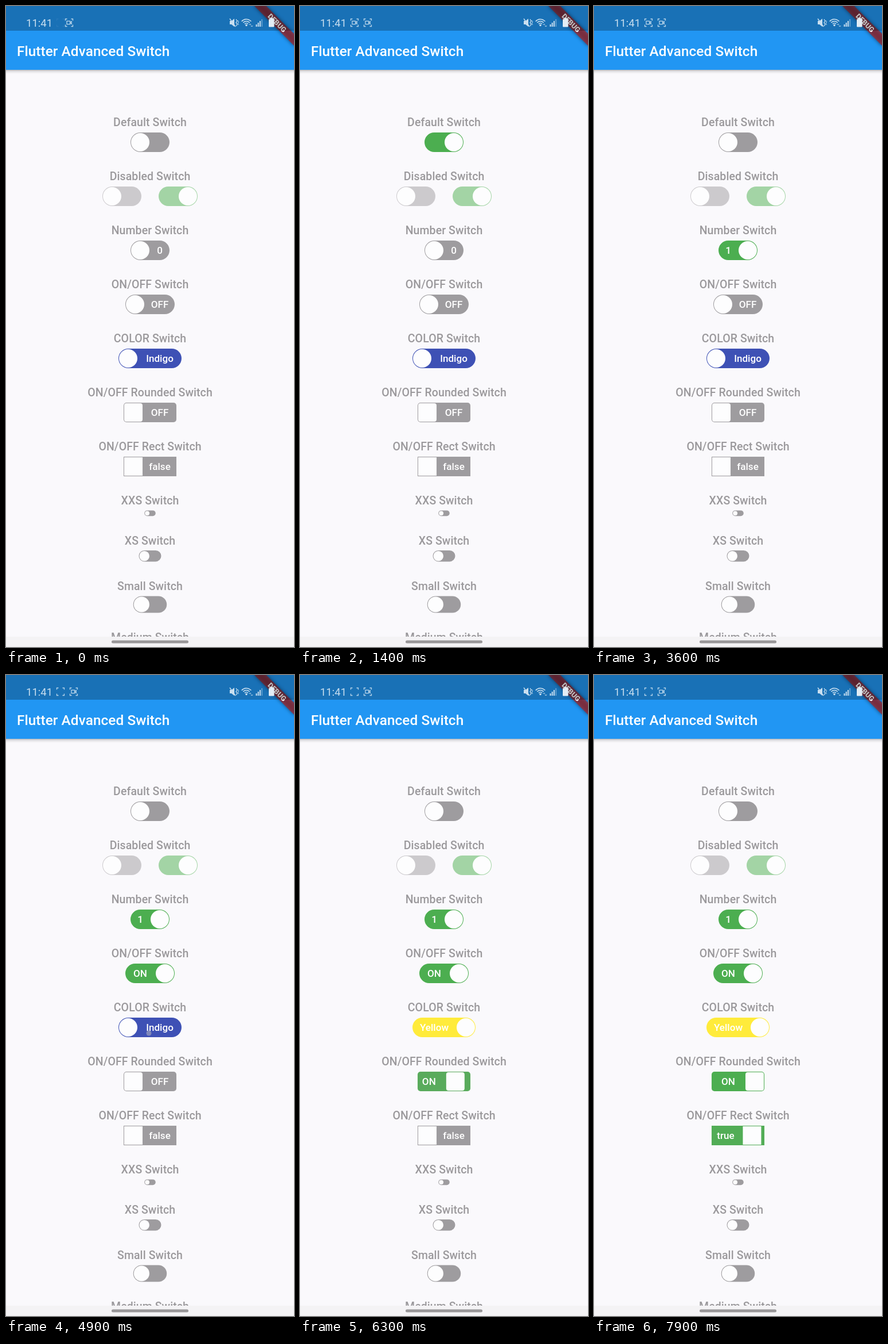
Write an HTML page with a canvas that moves like this. It is 502x1115 px and loops after 8000 ms.

```html
<!DOCTYPE html>
<html lang="en">
<head>
<meta charset="utf-8">
<title>Advanced Switch</title>
<style>
  html, body { margin: 0; width: 100%; height: 100%; overflow: hidden; background: #faf9fc; }
  canvas { display: block; width: 502px; height: 1115px; }
</style>
</head>
<body>
<canvas id="stage"></canvas>
<script>
const W = 502, H = 1115, CX = 251, LOOP = 8000, SLIDE = 250;
const GREY = [158, 156, 159], GREEN = [76, 174, 80], INDIGO = [62, 81, 181], YELLOW = [255, 235, 59];
const PALE_GREY = [204, 202, 205], PALE_GREEN = [163, 212, 165];
const BACK = '#faf9fc', KNOB = '#fdfdfe', LABEL = '#9b999c', STATUS = '#c9dff0';

const canvas = document.getElementById('stage');
const ratio = window.devicePixelRatio || 1;
canvas.width = W * ratio;
canvas.height = H * ratio;
const ctx = canvas.getContext('2d');

// taps: times at which the switch starts to toggle
const switches = [
  { y: 237, w: 68, taps: [900, 2100] },
  { x: 202, y: 331, w: 68, off: PALE_GREY },
  { x: 300, y: 331, w: 68, off: PALE_GREEN, fixed: 1 },
  { y: 425, w: 68, taps: [3100], texts: ['0', '1'] },
  { y: 519, w: 86, taps: [4300], texts: ['OFF', 'ON'] },
  { y: 613, w: 110, taps: [5230], texts: ['Indigo', 'Yellow'], off: INDIGO, on: YELLOW },
  { y: 707, w: 92, taps: [6120], texts: ['OFF', 'ON'], radius: 5 },
  { y: 801, w: 92, taps: [7700], texts: ['false', 'true'], radius: 0 },
  { y: 882.3, w: 19.5, h: 9.8 },
  { y: 956.7, w: 39, h: 19.5 },
  { y: 1041, w: 58.5, h: 29.2 }
];

const headings = [
  ['Default Switch', 202], ['Disabled Switch', 296], ['Number Switch', 390],
  ['ON/OFF Switch', 484], ['COLOR Switch', 578], ['ON/OFF Rounded Switch', 672],
  ['ON/OFF Rect Switch', 766], ['XXS Switch', 860], ['XS Switch', 929.5],
  ['Small Switch', 1008.5], ['Medium Switch', 1097.5]
];

const clamp = v => Math.min(1, Math.max(0, v));
const mix = (a, b, p) => `rgb(${a.map((v, i) => Math.round(v + (b[i] - v) * p))})`;

// cubic-bezier(.42, 0, .58, 1)
function easeInOut(x) {
  let lo = 0, hi = 1, u = x;
  for (let i = 0; i < 18; i++) {
    u = (lo + hi) / 2;
    const bx = 3 * u * (1 - u) * (1 - u) * 0.42 + 3 * u * u * (1 - u) * 0.58 + u * u * u;
    if (bx < x) lo = u; else hi = u;
  }
  return u * u * (3 - 2 * u);
}

function rect(x, y, w, h, color) {
  ctx.fillStyle = color;
  ctx.fillRect(x, y, w, h);
}

function roundRect(x, y, w, h, r, color) {
  ctx.beginPath();
  ctx.roundRect(x, y, w, h, r);
  ctx.fillStyle = color;
  ctx.fill();
}

function stroke(points, width = 1.3) {
  ctx.beginPath();
  points.forEach(([x, y], i) => i ? ctx.lineTo(x, y) : ctx.moveTo(x, y));
  ctx.lineWidth = width;
  ctx.stroke();
}

function text(str, x, baseline, size, color, align = 'center', weight = 500, spacing = 0) {
  ctx.font = `${weight} ${size}px Roboto, sans-serif`;
  ctx.letterSpacing = spacing + 'px';
  ctx.textAlign = align;
  ctx.fillStyle = color;
  ctx.fillText(str, x, baseline);
}

function drawSwitch(s, time) {
  const { x = CX, y, w, h = 34, radius = h / 2, off = GREY, on = GREEN, taps = [] } = s;
  const slides = taps.map(t => easeInOut(clamp((time - t) / SLIDE)));
  const p = s.fixed ?? slides.reduce((sum, v, i) => sum + (i % 2 ? -v : v), 0);
  const left = x - w / 2, top = y - h / 2, travel = w - h;
  const size = h - 2, knobX = left + 1 + travel * p;

  ctx.save();
  roundRect(left, top, w, h, radius, mix(off, on, s.fixed ? 0 : p));
  ctx.clip();
  if (s.texts) {
    text(s.texts[0], x + 17 + travel * p, y + 6, 17.08, '#fff');
    text(s.texts[1], x - 17 - travel * (1 - p), y + 6, 17.08, '#fff');
  }
  ctx.restore();
  roundRect(knobX, top + 1, size, size, Math.max(0, radius - 1), KNOB);

  // touch indicator shown before each toggle
  if (taps.some(t => time > t - 380 && time < t - 60)) {
    ctx.beginPath();
    ctx.arc(x - 2, y + 10, 4.5, 0, Math.PI * 2);
    ctx.fillStyle = 'rgba(150,155,190,.75)';
    ctx.fill();
  }
}

function drawRecordIcon(x, alpha, camera) {
  ctx.save();
  ctx.globalAlpha = alpha;
  ctx.translate(x, 29);
  for (const sx of [-1, 1]) for (const sy of [-1, 1])
    stroke([[3.5 * sx, 6.5 * sy], [6.5 * sx, 6.5 * sy], [6.5 * sx, 3.5 * sy]]);
  if (camera) {
    ctx.strokeRect(-4, -2.7, 5.6, 5.4);
    stroke([[2, -.5], [4.2, -2.2], [4.2, 2.2], [2, .5]]);
  }
  ctx.restore();
}

function drawBanner() {
  ctx.save();
  ctx.translate(W, 0);
  ctx.rotate(Math.PI / 4);
  ctx.save();
  ctx.filter = 'blur(3px)';
  rect(-49, 34.2, 98, 14.6, 'rgba(0,0,0,.5)');
  ctx.restore();
  rect(-49, 34.2, 98, 14.6, 'rgba(183,28,28,.63)');
  text('DEBUG', 0, 46, 12.4, '#fff', 'center', 900);
  ctx.restore();
}

function drawStatusBar(time) {
  rect(0, 0, W, 43, 'rgba(0,0,0,.25)');
  ctx.strokeStyle = ctx.fillStyle = STATUS;
  text('11:41', 35, 36, 18.5, STATUS, 'left', 400);

  const entry = clamp(time / 400), phase = time % 1000;
  drawRecordIcon(95, .08 + .82 * entry, phase >= 350 && phase < 850);
  drawRecordIcon(110 + 8 * entry, .9, true);

  // muted speaker with vibration
  ctx.beginPath();
  [[390, 26], [393, 26], [398, 22], [398, 36], [393, 32], [390, 32]].forEach(p => ctx.lineTo(...p));
  ctx.fill();
  stroke([[390, 22], [400, 36]], 1.4);
  stroke([[401, 23], [403, 26], [401, 29], [403, 32], [401, 35]]);
  stroke([[404, 25], [405.5, 28], [404, 30], [405.5, 33]], 1);

  // wifi
  for (const r of [4, 7.5, 11]) {
    ctx.beginPath();
    ctx.arc(419, 34, r, -Math.PI * .77, -Math.PI * .23);
    ctx.lineWidth = 1.6;
    ctx.stroke();
  }
  ctx.beginPath();
  ctx.arc(419, 33.5, 1.7, 0, Math.PI * 2);
  ctx.fill();
  stroke([[424, 33], [425.5, 31], [427, 33]], 1);
  stroke([[427, 34], [428.5, 36], [430, 34]], 1);

  // signal bars, the last one faint
  for (let i = 0; i < 4; i++) {
    ctx.globalAlpha = i < 3 ? 1 : .4;
    rect(435.5 + 3.2 * i, 32 - 3 * i, 2, 4 + 3 * i, STATUS);
  }
  ctx.globalAlpha = 1;
  roundRect(458, 22.5, 9.5, 14, 1, '#e3edf5');
  rect(460.5, 21, 4.5, 2, '#e3edf5');
}

function draw(time) {
  ctx.setTransform(ratio, 0, 0, ratio, 0, 0);
  rect(0, 0, W, H, BACK);
  for (const [str, y] of headings) text(str, CX, y + 7, 19.5, LABEL, 'center', 500, .08);
  for (const s of switches) drawSwitch(s, time);

  rect(0, 1097, W, 18, '#f4f3f5');
  roundRect(184, 1103.5, 134, 5, 2.5, '#999799');

  const shadow = ctx.createLinearGradient(0, 111, 0, 118);
  shadow.addColorStop(0, 'rgba(0,0,0,.26)');
  shadow.addColorStop(.4, 'rgba(0,0,0,.09)');
  shadow.addColorStop(1, 'rgba(0,0,0,0)');
  rect(0, 111, W, 7, shadow);
  rect(0, 0, W, 111, '#2196f3');
  text('Flutter Advanced Switch', 19, 86.5, 24.4, '#fff', 'left', 500, .05);
  drawBanner();
  drawStatusBar(time);
}

function tick() {
  draw(performance.now() % LOOP);
  requestAnimationFrame(tick);
}
tick();
</script>
</body>
</html>
```
